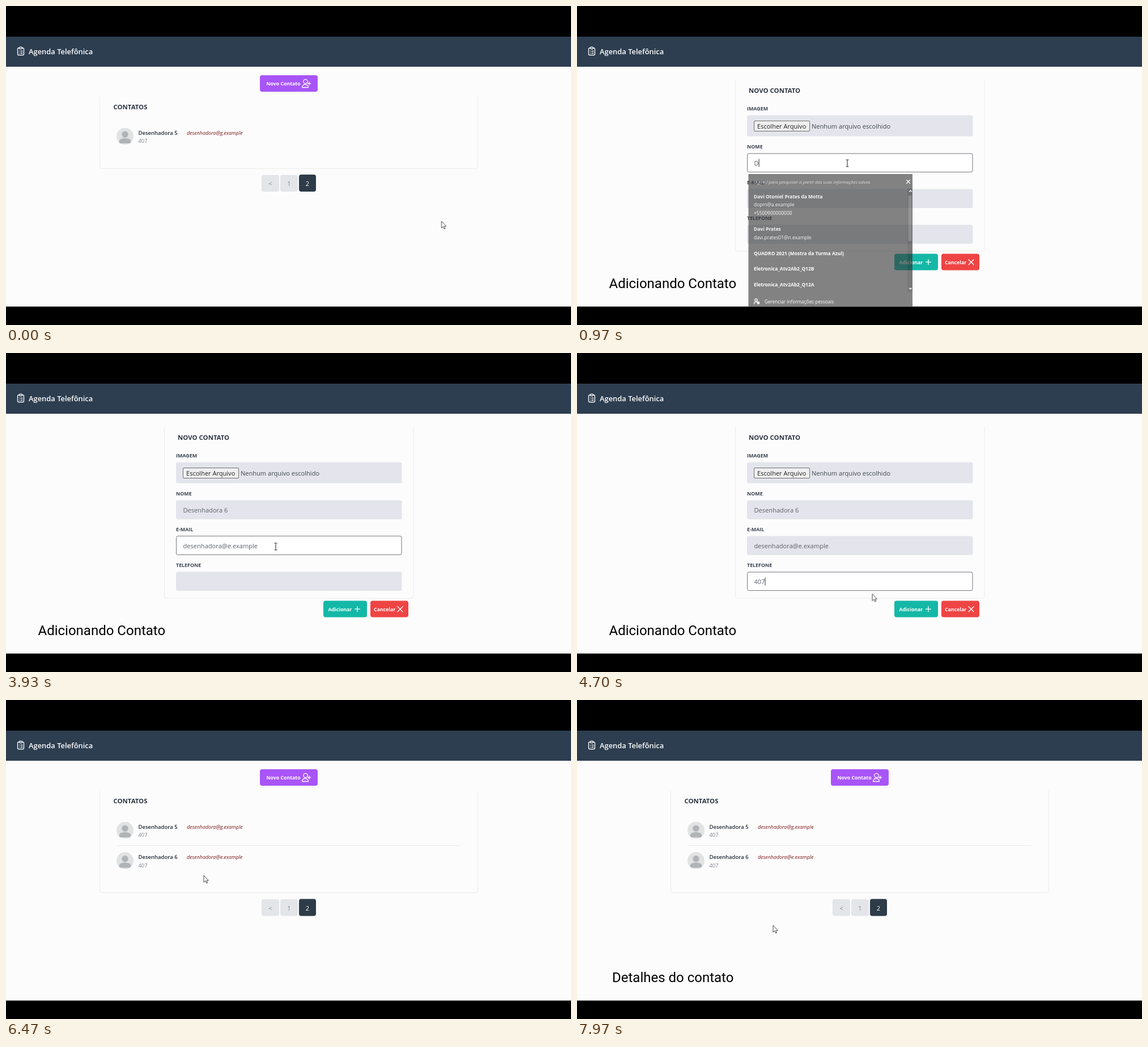
An HTML page that plays this animation: 997x562 px, repeating every 8000 ms.

```html
<!DOCTYPE html>
<html lang="pt-BR">
<head>
<meta charset="utf-8">
<title>Agenda Telefônica</title>
<style>
  html, body { margin: 0; width: 100%; height: 100%; overflow: hidden; background: #000; }
  svg { display: block; width: 100%; height: 100%; font-family: "Open Sans", "Noto Sans", sans-serif; }
  text { white-space: pre; }

  .brand { font-size: 12.9px; font-weight: 600; fill: #fff; }
  .title { font-size: 11.4px; font-weight: 700; fill: #2b3341; }
  .label { font-size: 8.9px; font-weight: 700; fill: #3b4351; }
  .button { font-size: 8.75px; font-weight: 700; fill: #fff; }
  .file { font-size: 11.05px; fill: #3f454f; }
  .value { font-size: 11.1px; fill: #5b6069; }
  .name { font-size: 9.5px; font-weight: 600; fill: #222a35; }
  .mail { font-size: 8.9px; font-style: italic; font-weight: 500; fill: #7f1d1d; }
  .phone { font-size: 9.3px; fill: #7c828d; }
  .page { font-size: 11px; fill: #85888f; text-anchor: middle; }
  .caption { font: 24px Roboto, sans-serif; }
  .option { font-size: 8.45px; fill: #fff; }
  .strong { font-weight: 700; }
  .hint { font-size: 7.8px; font-style: italic; fill: #c9c9c9; }
  .line { fill: none; stroke: #fff; stroke-width: 1.3; stroke-linecap: round; stroke-linejoin: round; }
  .field { fill: #e4e5ec; }
  .focus { fill: #fff; stroke: #777b80; }
  .panel { fill: none; stroke: #ebebe9; }

  .toggle { visibility: hidden; animation: 8s step-end infinite; }
  #list-before { animation-name: list-before; }
  #form { animation-name: form; }
  #list-after { animation-name: list-after; }
  #notice { animation-name: notice; }
  #new-button { animation-name: new-button; }
  #focus-name { animation-name: focus-name; }
  #focus-mail { animation-name: focus-mail; }
  #focus-phone { animation-name: focus-phone; }
  #arrow { animation-name: arrow; }
  #hand { animation-name: hand; }
  #beam { animation-name: beam; }
  @keyframes list-before { 0% { visibility: visible } 6%, 100% { visibility: hidden } }
  @keyframes form { 0% { visibility: hidden } 6% { visibility: visible } 64%, 100% { visibility: hidden } }
  @keyframes list-after { 0% { visibility: hidden } 64%, 100% { visibility: visible } }
  @keyframes notice { 0% { visibility: hidden } 64% { visibility: visible } 76%, 100% { visibility: hidden } }
  @keyframes new-button { 0% { visibility: visible } 6% { visibility: hidden } 64%, 100% { visibility: visible } }
  @keyframes focus-name { 0% { visibility: hidden } 9.6% { visibility: visible } 26%, 100% { visibility: hidden } }
  @keyframes focus-mail { 0% { visibility: hidden } 26% { visibility: visible } 51.5%, 100% { visibility: hidden } }
  @keyframes focus-phone { 0% { visibility: hidden } 51.5% { visibility: visible } 64%, 100% { visibility: hidden } }
  @keyframes arrow {
    0% { visibility: visible } 4.2% { visibility: hidden } 6% { visibility: visible }
    8.6% { visibility: hidden } 58% { visibility: visible } 60.2% { visibility: hidden } 64%, 100% { visibility: visible }
  }
  @keyframes hand {
    0% { visibility: hidden } 4.2% { visibility: visible } 6% { visibility: hidden }
    60.2% { visibility: visible } 64%, 100% { visibility: hidden }
  }
  @keyframes beam { 0% { visibility: hidden } 8.6% { visibility: visible } 58%, 100% { visibility: hidden } }

  #pointer { animation: pointer 8s ease-in-out infinite; }
  @keyframes pointer {
    0% { transform: translate(768.5px, 379px) }
    4.5%, 6.2% { transform: translate(505px, 141px) }
    9.3%, 23% { transform: translate(477px, 277px) }
    26% { transform: translate(474px, 340px) }
    30% { transform: translate(474px, 340px) }
    47%, 49.2% { transform: translate(476px, 341px) }
    51.4%, 57% { transform: translate(471px, 402px) }
    61%, 72% { transform: translate(596.5px, 458px) }
    80.5%, 84% { transform: translate(349px, 309px) }
    95%, 100% { transform: translate(346px, 397px) }
  }

  #popup { opacity: 0; animation: popup 8s linear infinite; }
  @keyframes popup { 0%, 9.8% { opacity: 0 } 10.2%, 11.75% { opacity: 1 } 12.8%, 100% { opacity: 0 } }
  #caption-add { opacity: 0; animation: caption-add 8s linear infinite; }
  @keyframes caption-add { 0%, 4% { opacity: 0 } 8%, 59% { opacity: 1 } 63%, 100% { opacity: 0 } }
  #caption-details { opacity: 0; animation: caption-details 8s linear infinite; }
  @keyframes caption-details { 0%, 86% { opacity: 0 } 90%, 100% { opacity: 1 } }
</style>
</head>
<body>
<svg viewBox="0 0 997 562" preserveAspectRatio="none">
  <defs>
    <clipPath id="round"><circle cx="15" cy="15" r="15"/></clipPath>
    <g id="avatar" clip-path="url(#round)">
      <rect width="30" height="30" fill="#e1e2e2"/>
      <circle cx="15" cy="11.8" r="5.7" fill="#b1b4b6"/>
      <path d="M4.5 27.5v-3c0-4 4-6 10.500-6s10.500 2 10.500 6v3z" fill="#b1b4b6"/>
    </g>
    <g id="pager">
      <rect x="451" y="297.500" width="31" height="29.500" rx="4" fill="#e4e5e9"/>
      <rect x="484" y="297.500" width="31" height="29.500" rx="4" fill="#e4e5e9"/>
      <rect x="517" y="297" width="30" height="30" rx="4" fill="#2d3c48"/>
      <text class="page" x="466.500" y="317">&lt;</text>
      <text class="page" x="499.500" y="317">1</text>
      <text class="page" x="532" y="317" style="fill:#fff">2</text>
    </g>
    <g id="contact-first">
      <text class="title" x="189.500" y="182">CONTATOS</text>
      <use href="#avatar" x="195" y="214.500"/>
      <text class="name" x="233.500" y="226.500">Desenhadora 5</text>
      <text class="mail" x="319" y="226.500">desenhadora@g.example</text>
      <text class="phone" x="233.500" y="241">407</text>
    </g>
  </defs>

  <rect y="54" width="997" height="475.500" fill="#fcfcfc"/>
  <rect y="54" width="997" height="53" fill="#2d3e50"/>
  <g class="line">
    <rect x="20.500" y="74" width="11" height="12.500" rx="2"/>
    <rect x="23.500" y="72.500" width="5" height="3" rx="1" fill="#2d3e50"/>
    <path d="M23.500 79.500h.1M26 79.500h3M23.500 83h.1M26 83h3"/>
  </g>
  <text class="brand" x="40" y="85">Agenda Telefônica</text>

  <g id="new-button" class="toggle">
    <rect x="448" y="122" width="102" height="29" rx="4" fill="#a855f7"/>
    <text class="button" x="459.500" y="140">Novo Contato</text>
    <g class="line">
      <circle cx="528.500" cy="133" r="3.700"/>
      <path d="M522.500 143.500c0-7 11-7 11 0zM532.500 136.500h5M535 134v5"/>
    </g>
  </g>

  <g id="list-before" class="toggle">
    <path class="panel" d="M165.500 160V282q0 4.500 4.500 4.500H828q4.500 0 4.500-4.500V160"/>
    <use href="#contact-first"/>
    <use href="#pager"/>
  </g>

  <g id="list-after" class="toggle">
    <path class="panel" d="M165.500 160V335q0 4.500 4.500 4.500H828q4.500 0 4.500-4.500V160"/>
    <use href="#contact-first"/>
    <path class="panel" d="M196 256.500H802"/>
    <use href="#avatar" x="195" y="268"/>
    <text class="name" x="233.500" y="280">Desenhadora 6</text>
    <text class="mail" x="319" y="280">desenhadora@e.example</text>
    <text class="phone" x="233.500" y="294.500">407</text>
    <use href="#pager" y="53.500"/>
  </g>

  <g id="notice" class="toggle">
    <rect y="118" width="997" height="53.500" fill="#e7e8e2"/>
    <rect y="116" width="997" height="53.500" fill="#d3fae4"/>
    <rect y="116" width="997" height="3" fill="#2fcf70"/>
    <circle cx="19.500" cy="139" r="8" fill="none" stroke="#22c55e" stroke-width="1.800"/>
    <path d="M19.500 138v5M19.500 135v.3" stroke="#22c55e" stroke-width="1.800" stroke-linecap="round"/>
    <text x="40" y="141" font-size="11.300" font-weight="700" fill="#1c4a3a">Aviso!</text>
    <text x="40" y="156.500" font-size="9.750" fill="#4a6f62">Contato adicionado com sucesso.</text>
  </g>

  <g id="form" class="toggle">
    <path class="panel" d="M279.500 130V428q0 4 4 4H715q4 0 4-4V130"/>
    <text class="title" x="303" y="152.500">NOVO CONTATO</text>
    <text class="label" x="300" y="184">IMAGEM</text>
    <text class="label" x="300" y="251">NOME</text>
    <text class="label" x="300" y="314">E-MAIL</text>
    <text class="label" x="300" y="377">TELEFONE</text>
    <rect class="field" x="300" y="192.500" width="398.500" height="37" rx="3"/>
    <rect class="field" x="300" y="259.500" width="398.500" height="33.500" rx="3"/>
    <rect class="field" x="300" y="322.500" width="398.500" height="33.500" rx="3"/>
    <rect class="field" x="300" y="385.500" width="398.500" height="33.500" rx="3"/>
    <rect x="312.500" y="202.500" width="98" height="18" rx="1.500" fill="#efefef" stroke="#6d6d6d"/>
    <text class="file" x="318" y="215.500" style="fill:#222">Escolher Arquivo</text>
    <text class="file" x="414" y="215.500">Nenhum arquivo escolhido</text>
    <rect x="560" y="436.500" width="77" height="29" rx="4" fill="#14b8a6"/>
    <text class="button" x="568.500" y="454.500">Adicionar</text>
    <path class="line" d="M615.500 451.200h9M620 446.700v9"/>
    <rect x="643" y="436.500" width="67" height="29" rx="4" fill="#ef4444"/>
    <text class="button" x="649" y="454.500">Cancelar</text>
    <path class="line" d="M691 446.700l9 9M700 446.700l-9 9"/>
  </g>
  <rect id="focus-name" class="toggle focus" x="300.500" y="260" width="397.500" height="32.500" rx="3"/>
  <rect id="focus-mail" class="toggle focus" x="300.500" y="322.500" width="397.500" height="33" rx="3"/>
  <rect id="focus-phone" class="toggle focus" x="300.500" y="386" width="397.500" height="32.500" rx="3"/>
  <text id="value-name" class="value" x="312.500" y="280.500"></text>
  <text id="value-mail" class="value" x="312.500" y="343.500"></text>
  <text id="value-phone" class="value" x="312.500" y="406.500"></text>
  <rect id="caret" width="1" height="14" fill="#333" visibility="hidden"/>

  <g id="popup">
    <rect x="302.500" y="296" width="289.500" height="233.500" fill="#3b3b3b"/>
    <rect x="583" y="321" width="9" height="183" fill="#2c2c2c"/>
    <rect x="584.500" y="334" width="6" height="80" fill="#595959"/>
    <text class="hint" x="312" y="312.500">Digite / para pesquisar a partir das suas informações salvas</text>
    <path class="line" d="M581.500 306.500l6 6M587.500 306.500l-6 6M586.500 327l2-2 2 2M586.500 497l2 2 2-2" stroke-width="1"/>
    <g class="option">
      <text class="strong" x="312" y="339">Davi Otoniel Prates da Motta</text>
      <text x="312" y="353">dopm@a.example</text>
      <text x="312" y="367.500">+5500900000000</text>
      <text class="strong" x="312" y="396">Davi Prates</text>
      <text x="312" y="410.500">davi.prates01@n.example</text>
      <text class="strong" x="312" y="438.500">QUADRO 2021 (Mostra da Turma Azul)</text>
      <text class="strong" x="312" y="466">Eletronica_Atv2Ab2_Q12B</text>
      <text class="strong" x="312" y="494">Eletronica_Atv2Ab2_Q12A</text>
      <text x="331" y="524" font-size="8.200">Gerenciar informações pessoais</text>
    </g>
    <g class="line">
      <circle cx="316" cy="518" r="2.200"/>
      <path d="M312.500 525c0-4 4-4 5-3.500"/>
      <rect x="318.500" y="521.500" width="3" height="3" fill="#fff"/>
    </g>
  </g>

  <text id="caption-add" class="caption" x="56.500" y="497">Adicionando Contato</text>
  <text id="caption-details" class="caption" x="62" y="497">Detalhes do contato</text>

  <g id="pointer">
    <path id="arrow" class="toggle" d="M0 0V12.200L2.900 9.600 4.800 13.800 6.600 13 4.800 9H8.300Z" fill="#fff" stroke="#333" stroke-width=".9"/>
    <path id="hand" class="toggle" d="M-1 0q1-1 2 0V5l5 1.200q1.500.5 1.200 2.500L6.500 13H0L-4 8q0-1.500 1.500-1L-1 8Z" fill="#fff" stroke="#333" stroke-width=".9"/>
    <path id="beam" class="toggle" d="M-2.500-6H2.500M0-6V6M-2.500 6H2.500" fill="none" stroke="#333" stroke-width="1.100"/>
  </g>
</svg>
<script>
  const LOOP = 8000, FORM_CLOSES = 5120;
  const byId = id => document.getElementById(id);
  const caret = byId('caret');
  const inputs = [
    { node: byId('value-name'), text: 'Desenhadora 6', focus: 768, blur: 2080, start: 940, pace: 65 },
    { node: byId('value-mail'), text: 'desenhadora@e.example', focus: 2080, blur: 4120, start: 2190, pace: 58 },
    { node: byId('value-phone'), text: '407', focus: 4120, blur: FORM_CLOSES, start: 4240, pace: 110 }
  ];

  function draw(now) {
    const t = now % LOOP;
    let caretShown = false;
    for (const { node, text, focus, blur, start, pace } of inputs) {
      const typed = Math.max(0, Math.floor((t - start) / pace) + 1);
      node.textContent = t < FORM_CLOSES ? text.slice(0, typed) : '';
      if (t < focus || t >= blur) continue;

      // The caret stays lit while typing and blinks after the last key.
      const lastKey = typed ? start + (Math.min(typed, text.length) - 1) * pace : focus;
      caretShown = (t - lastKey) % 1060 < 530;
      caret.setAttribute('x', 312.5 + node.getComputedTextLength());
      caret.setAttribute('y', node.getAttribute('y') - 11);
    }
    caret.setAttribute('visibility', caretShown ? 'visible' : 'hidden');
    requestAnimationFrame(draw);
  }
  requestAnimationFrame(draw);
</script>
</body>
</html>
```
